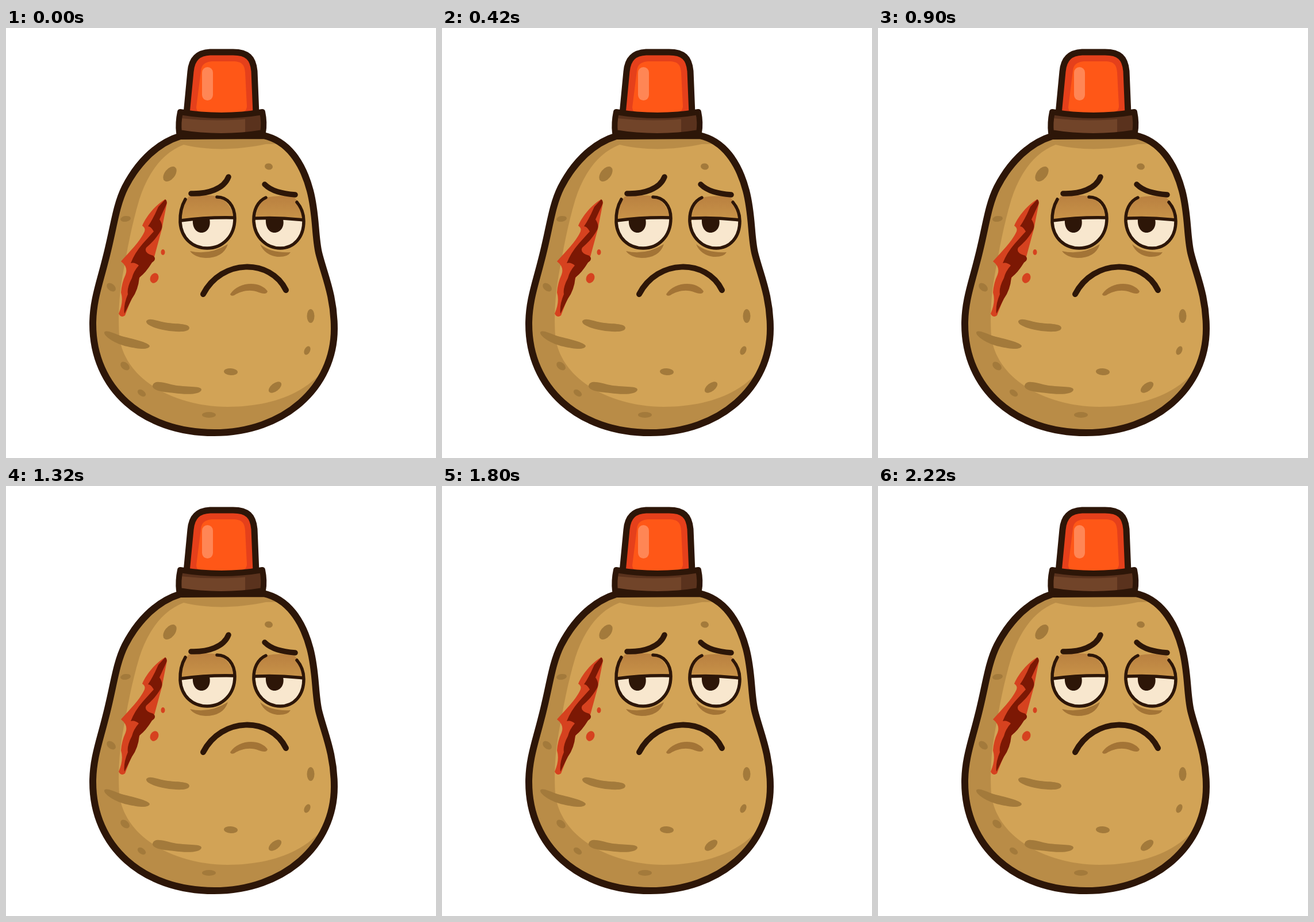
An HTML page that plays this animation: 748x748 px, repeating every 2.5 s.

```html
<!DOCTYPE html>
<html lang="en">
<head>
<meta charset="utf-8">
<title>Potato alarm</title>
<style>
  html, body { margin: 0; height: 100%; overflow: hidden; background: #fff; }
  svg { display: block; width: 100vw; height: 100vh; }
  .ink { fill: none; stroke: #2d1608; stroke-linecap: round; stroke-linejoin: round; }
  .spot { fill: #a37a3b; }
  .bag { fill: #a37436; }
</style>
</head>
<body>
<svg viewBox="0 0 748 748">
  <defs>
    <path id="body" d="M303 188C258 202 226 240 207 277C190 311 187 352 172 407C163 443 151 475 151 515C151 627 238 704 362 704C484 704 571 625 571 523C571 465 553 428 544 391C537 360 540 325 529 283C516 234 490 196 448 187Z"/>
    <clipPath id="inside"><use href="#body"/></clipPath>
    <linearGradient id="lid" x2="0" y2="1">
      <stop stop-color="#b98040"/><stop offset="1" stop-color="#c99449"/>
    </linearGradient>
  </defs>

  <rect id="flash" width="748" height="748" fill="#fff"/>

  <use href="#body" fill="#b98c47"/>
  <path clip-path="url(#inside)" fill="#d2a356" d="M309 203C350 213 400 213 452 202L600 200V520L566 575C535 630 470 659 385 659C290 658 205 610 197 535C195 505 196 470 203 430C211 385 218 345 232 298C246 255 270 218 309 203Z"/>
  <g id="spots" class="spot">
    <path d="M171 529C176 524 190 533 205 537C221 541 248 547 250 553C249 560 232 559 211 554C191 550 169 536 171 529Z"/>
    <path d="M244 510C249 502 264 511 282 513C300 515 319 514 319 522C318 530 296 529 278 526C261 523 243 517 244 510Z"/>
    <path d="M255 622C258 611 274 617 292 621C311 625 340 622 340 629C339 638 314 638 292 635C273 633 254 631 255 622Z"/>
  </g>
  <use href="#body" class="ink" stroke-width="12"/>

  <!-- Beacon -->
  <path fill="#e5401b" d="M314 149L321 76C323 52 335 43 355 42H395C420 42 430 52 432 75L435 149Z"/>
  <path fill="#ff5717" d="M331 138L339 75C340 63 347 59 358 58H395C410 58 415 64 416 77L419 136Q419 146 407 147H342Q331 147 331 138Z"/>
  <rect x="341" y="68" width="19" height="58" rx="9.5" fill="#ff8655"/>
  <path class="ink" stroke-width="11" d="M314 149L321 76C323 52 335 43 355 42H395C420 42 430 52 432 75L435 149"/>
  <path fill="#714429" d="M303 147Q375 158 447 147Q450 165 447 183Q375 194 301 183Q299 165 303 147Z"/>
  <path fill="#5a321d" d="M416 151L447 147Q450 165 447 183L416 187ZM303 150Q375 160 447 150V155Q375 165 303 157Z"/>
  <path class="ink" stroke-width="10" d="M303 146Q375 158 446 146Q450 165 447 182Q375 194 301 182Q299 165 303 146Z"/>

  <!-- Eyes -->
  <path fill="url(#lid)" d="M318 293Q345 289 370 293Q391 305 397 330L304 334Q305 309 318 293Z"/>
  <path fill="url(#lid)" d="M451 295Q475 290 501 294Q517 310 518 334L434 330Q437 307 451 295Z"/>
  <path fill="#f8e7ce" d="M304 335L397 330C399 363 376 382 350 382C324 382 305 364 304 335Z"/>
  <path fill="#f8e7ce" d="M434 331L518 334C518 363 501 382 477 382C452 382 433 362 434 331Z"/>
  <g fill="#2d1608">
    <path d="M325 334L354 332C357 346 350 356 340 356C330 356 324 346 325 334Z"/>
    <path d="M452 332L482 333C485 346 477 356 467 356C457 356 451 346 452 332Z"/>
  </g>
  <g class="ink" stroke-width="5.5">
    <path d="M312 298Q302 315 303 338C305 366 325 383 350 383C376 383 398 363 398 331C398 309 385 294 367 294"/>
    <path d="M304 335Q348 329 397 330"/>
    <path d="M452 295C438 301 430 317 431 337C433 364 453 383 477 383C501 383 518 364 518 336Q518 317 506 303"/>
    <path d="M434 331Q477 329 517 334"/>
  </g>
  <path class="bag" d="M320 388Q354 396 386 376Q378 400 347 400Q328 399 320 388Z"/>
  <path class="bag" d="M442 376Q461 392 495 390Q490 399 472 398Q450 395 442 376Z"/>

  <!-- Brows and mouth -->
  <path class="ink" stroke-width="9.5" d="M322 288C351 289 379 280 387 259M450 272C462 284 480 288 503 290"/>
  <path class="ink" stroke-width="10" d="M343 463C375 401 460 401 487 456"/>
  <path class="bag" d="M390 463C405 440 443 440 455 458C453 464 447 462 440 460C425 454 410 457 397 465Q391 467 390 463Z"/>

  <!-- Scratch -->
  <path fill="#d6421f" d="M277 298C261 307 244 327 237 344Q245 349 239 358C230 374 220 384 200 406Q213 416 208 429Q201 444 200 460Q205 476 196 497Q200 505 207 500L232 435L258 398L271 350L280 304Z"/>
  <path fill="#7c1804" d="M277 298Q282 301 278 309L267 333Q274 343 270 351Q260 369 244 382Q239 391 256 396Q263 402 254 408Q243 426 232 434Q230 456 219 471L206 497Q204 482 212 463Q210 452 219 435Q222 423 231 413Q224 407 217 409Q224 391 238 375L257 354Q252 345 247 345Q256 332 265 311Z"/>
  <g fill="#d6421f">
    <ellipse cx="258" cy="435" rx="7" ry="9" transform="rotate(25 258 435)"/>
    <ellipse cx="273" cy="390" rx="3.5" ry="5"/>
  </g>
</svg>
<script>
  const flash = document.getElementById("flash");
  const spots = document.getElementById("spots");

  // cx, cy, rx, ry, rotation
  [
    [285, 254, 9, 15, 38], [457, 241, 7, 5.5, 10], [208, 332, 9, 5, -8],
    [183, 451, 9, 6, 40], [530, 501, 6.5, 12, 0], [524, 561, 5, 8, 25],
    [207, 588, 9, 6, 40], [236, 635, 8, 5, 35], [391, 598, 12, 6, 3],
    [468, 625, 13, 7, -38], [353, 673, 12, 5, 0]
  ].forEach(([cx, cy, rx, ry, angle]) => {
    const spot = document.createElementNS("http://www.w3.org/2000/svg", "ellipse");
    const attributes = { cx, cy, rx, ry, transform: `rotate(${angle} ${cx} ${cy})` };
    for (const name in attributes) spot.setAttribute(name, attributes[name]);
    spots.append(spot);
  });

  function draw() {
    const lit = (performance.now() % 2500) % 900 >= 700;
    flash.setAttribute("fill", lit ? "#f00" : "#fff");
    requestAnimationFrame(draw);
  }
  draw();
</script>
</body>
</html>
```
